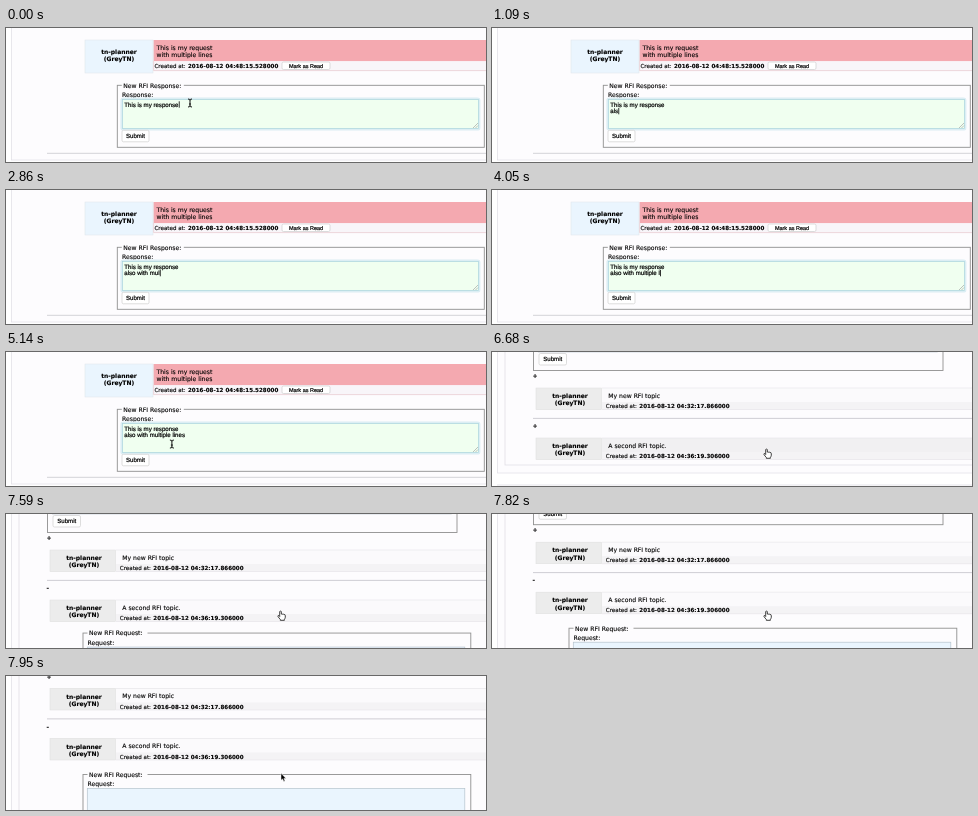
Write an HTML page that moves like this. It is 480x134 px and loops after 8000 ms.

```html
<!DOCTYPE html>
<html lang="en">
<head>
<meta charset="utf-8">
<title>RFI response</title>
<style>
  html, body { margin: 0; width: 100%; height: 100%; overflow: hidden; background: #fff; }
  svg { display: block; width: 480px; height: 134px; }
  text {
    font: 6.1px "DejaVu Sans", sans-serif; fill: #000; stroke: #000; stroke-width: 0.12px;
    white-space: pre; text-rendering: geometricPrecision;
  }
  .name { font-size: 6px; font-weight: bold; text-anchor: middle; }
  .small { font-size: 5.55px; }
  .bold { font-weight: bold; }
  .arial { font-family: "Liberation Sans", Arial, sans-serif; stroke-width: 0.2px; }
</style>
</head>
<body>
<svg id="stage" viewBox="0 0 480 134"></svg>
<script>
const LOOP = 8000;
const CUT = 6590, EXPAND = 7320, SLIDE = 400, SCROLL = 7740;
const FIRST_KEY = 470, KEY_GAP = 177;
const LINE = "also with multiple lines";
const LAST_KEY = FIRST_KEY + KEY_GAP * LINE.length;
const FORM_HEIGHT = 110, FORM_MARGIN = 12.5;

const stage = document.getElementById("stage");

function el(parent, tag, attrs, content) {
  const node = document.createElementNS("http://www.w3.org/2000/svg", tag);
  for (const key in attrs) node.setAttribute(key, attrs[key]);
  if (content) node.textContent = content;
  parent.appendChild(node);
  return node;
}
const group = (parent, attrs = {}) => el(parent, "g", attrs);
const rect = (parent, x, y, width, height, fill, more = {}) =>
  el(parent, "rect", { x, y, width, height, fill, ...more });
const text = (parent, x, y, content, cls = "", more = {}) =>
  el(parent, "text", { x, y, class: cls, ...more }, content);
const path = (parent, d, stroke, width = 1, fill = "none") =>
  el(parent, "path", { d, stroke, "stroke-width": width, fill });
const show = (node, on) => node.setAttribute("visibility", on ? "visible" : "hidden");
const move = (node, x, y) => node.setAttribute("transform", `translate(${x} ${y})`);

function button(parent, x, y, w, h, label, size) {
  rect(parent, x, y, w, h, "#fff", { rx: 1.5, stroke: "#cfcfcf", "stroke-width": 0.7 });
  text(parent, x + w / 2, y + h / 2 + size * 0.36, label, "arial",
    { style: `font-size:${size}px;text-anchor:middle` });
}

function author(parent, x, y) {
  text(parent, x, y, "tn-planner", "name");
  text(parent, x, y + 7.4, "(GreyTN)", "name");
}

function created(parent, x, y, stamp) {
  text(parent, x, y, "Created at:", "small");
  text(parent, x + 33.5, y, stamp, "small bold");
}

function fieldset(parent, x, y, w, h, legend, legendWidth) {
  rect(parent, x, y, w, h, "none", { stroke: "#909090", "stroke-width": 0.9 });
  rect(parent, x + 4.5, y - 2, legendWidth, 4, "#fdfcfe");
  text(parent, x + 6, y + 2.3, legend);
}

// Response form
const reply = group(stage);
rect(reply, 0, 0, 480, 134, "#fff");
rect(reply, 5.5, -5, 480, 137, "#fdfcfe", { stroke: "#e3e1e8", "stroke-width": 0.8 });
path(reply, "M41 125.3H480", "#d0ced5", 0.9);
rect(reply, 79, 12, 68, 33, "#eaf5fe", { stroke: "#e2e6ec", "stroke-width": 0.6 });
rect(reply, 148, 12, 332, 21.3, "#f4a9b0");
rect(reply, 148, 33.3, 332, 9.2, "#f8f5f9");
path(reply, "M147.6 12V42.6H480", "#e9c9cf", 0.7);
author(reply, 113, 26);
text(reply, 150.5, 21.7, "This is my request");
text(reply, 150.5, 28.8, "with multiple lines");
created(reply, 148.5, 40, "2016-08-12 04:48:15.528000");
button(reply, 276, 34, 48, 7.5, "Mark as Read", 5.5);
fieldset(reply, 111.3, 57.3, 367, 62, "New RFI Response:", 62);
text(reply, 116, 69, "Response:");
const glow = rect(reply, 115.6, 70.6, 357.6, 30.8, "none",
  { rx: 1.5, stroke: "#dceef4", "stroke-width": 2.4 });
const box = rect(reply, 116.5, 71.5, 356, 29, "#f0fff0", { "stroke-width": 0.7 });
path(reply, "M467 100L472 95M469.5 100L472 97.5", "#999", 0.6);
button(reply, 116, 102.3, 27, 11.5, "Submit", 6.1);
const firstLine = text(reply, 118.3, 78.5, "This is my response", "arial");
const typed = text(reply, 118.3, 85.1, "", "arial");
const caret = rect(reply, 0, 0, 0.8, 6.4, "#000");

// Topic list
const list = group(stage);
rect(list, 0, -10, 480, 300, "#fff");
const outer = rect(list, 5.5, -10, 490, 131, "#fdfcfe", { stroke: "#e3e1e8", "stroke-width": 0.8 });
const inner = rect(list, 13, -10, 490, 123, "#fdfcfe", { stroke: "#e0dee5", "stroke-width": 0.8 });
const pageEnd = path(list, "M5 133H480", "#dcdae2", 0.7);
rect(list, 41.5, -30, 409.5, 48.5, "none", { stroke: "#909090", "stroke-width": 0.9 });
rect(list, 46.5, -20, 399, 20, "#eaf4fd", { stroke: "#b5c3cd", "stroke-width": 0.6 });
button(list, 47, 1.5, 27.5, 11.5, "Submit", 6.1);

function topic(y, title, stamp) {
  rect(list, 44, y, 65.5, 21.5, "#ececec", { stroke: "#e0e0e0", "stroke-width": 0.6 });
  const head = rect(list, 110, y, 370, 14, "#fbfafc");
  rect(list, 110, y + 14, 370, 7.5, "#f4f3f5");
  path(list, `M110 ${y}H480M110 ${y + 21.5}H480`, "#e4e3e7", 0.6);
  author(list, 78, y + 10);
  text(list, 116.3, y + 9.8, title);
  created(list, 113.8, y + 20, stamp);
  return head;
}
topic(36, "My new RFI topic", "2016-08-12 04:32:17.866000");
const hovered = topic(86, "A second RFI topic.", "2016-08-12 04:36:19.306000");
path(list, "M41 66.4H480", "#cbc9d0", 0.9);
text(list, 40.6, 26, "+", "bold");
const toggle = text(list, 40.6, 76, "+", "bold");

const clip = el(el(stage, "defs"), "clipPath", { id: "slide" });
const clipBox = rect(clip, 41, 109, 439, 0, "#000");
const slideBox = group(list, { "clip-path": "url(#slide)" });
const form = group(slideBox);
fieldset(form, 77, 122, 387.8, 84, "New RFI Request:", 60);
text(form, 81.5, 133.6, "Request:");
rect(form, 81.3, 136, 377.5, 48, "#eaf5fe", { stroke: "#b5c3cd", "stroke-width": 0.7 });
button(form, 82, 188, 27, 11.5, "Submit", 6.1);

// Pointers, each with its hot spot at the origin
const beam = group(stage);
path(beam, "M-2 -4Q0 -4 0 -2.8Q0 -4 2 -4M0 -3V3M-2 4Q0 4 0 2.8Q0 4 2 4M-1 1H1", "#111", 1);
const arrow = group(stage);
path(arrow, "M0 0V7L1.6 5.6L2.8 8.2L4 7.6L2.9 5.1H5Z", "#fff", 0.5, "#000");
const hand = group(stage);
path(hand, "M-.8 .2Q0 -.6 .8 .2V2.8Q1.6 2.3 2.2 3Q3 2.6 3.5 3.3Q4.8 3 4.8 4.2V6Q4.6 7.2 3.9 8V9H-.2V8.1Q-1.4 7 -2.6 5Q-2.7 4 -1.7 4.3L-.8 5.2Z",
  "#111", 0.8, "#fff");
move(hand, 274.5, 97.3);

const trail = [[4930, 184, 75], [5140, 166, 92], [5480, 133, 112], [5750, 130, 109]];

function pointerAt(t) {
  const i = trail.findIndex(p => p[0] > t);
  if (i === 0) return trail[0].slice(1);
  if (i < 0) return trail[trail.length - 1].slice(1);
  const [t0, x0, y0] = trail[i - 1], [t1, x1, y1] = trail[i];
  const k = (t - t0) / (t1 - t0);
  return [x0 + (x1 - x0) * k, y0 + (y1 - y0) * k];
}

function drawReply(t) {
  const count = Math.floor((t - FIRST_KEY) / KEY_GAP);
  typed.textContent = LINE.slice(0, Math.max(0, count));
  const focused = t < 5690;
  const line = t < FIRST_KEY ? firstLine : typed;
  caret.setAttribute("x", 118.6 + (line.textContent ? line.getComputedTextLength() : 0));
  caret.setAttribute("y", t < FIRST_KEY ? 73.3 : 79.9);
  show(caret, focused && (t < LAST_KEY || (t - LAST_KEY) % 800 < 400));
  show(glow, focused);
  box.setAttribute("stroke", focused ? "#a9d3dd" : "#b5c3cd");
}

function drawList(t) {
  const k = Math.min(1, Math.max(0, (t - EXPAND) / SLIDE));
  const open = 0.5 - Math.cos(k * Math.PI) / 2;
  const grow = open * FORM_HEIGHT;
  const s = Math.min(1, Math.max(0, (t - SCROLL) / (7950 - SCROLL)));
  move(list, 0, -23.5 * s * s * (3 - 2 * s));
  move(form, 0, (open - 1) * FORM_MARGIN);
  clipBox.setAttribute("height", grow);
  outer.setAttribute("height", 131 + grow);
  inner.setAttribute("height", 123 + grow);
  move(pageEnd, 0, grow);
  toggle.textContent = t < EXPAND ? "+" : "-";
  hovered.setAttribute("fill", t < EXPAND ? "#f1f0f2" : "#fbfafc");
}

function draw(t) {
  const onList = t >= CUT;
  reply.setAttribute("display", onList ? "none" : "inline");
  list.setAttribute("display", onList ? "inline" : "none");
  if (onList) drawList(t); else drawReply(t);

  const [x, y] = onList ? [275, 97.3] : pointerAt(t);
  const late = t > 7900;
  const moving = t < FIRST_KEY || t >= trail[0][0];
  move(beam, x, y);
  move(arrow, x, y);
  show(beam, !onList && moving && y < 101);
  show(arrow, onList ? late : y >= 101);
  show(hand, onList && !late);
}

const start = performance.now();
function frame() {
  draw((performance.now() - start) % LOOP);
  requestAnimationFrame(frame);
}
frame();
</script>
</body>
</html>
```
